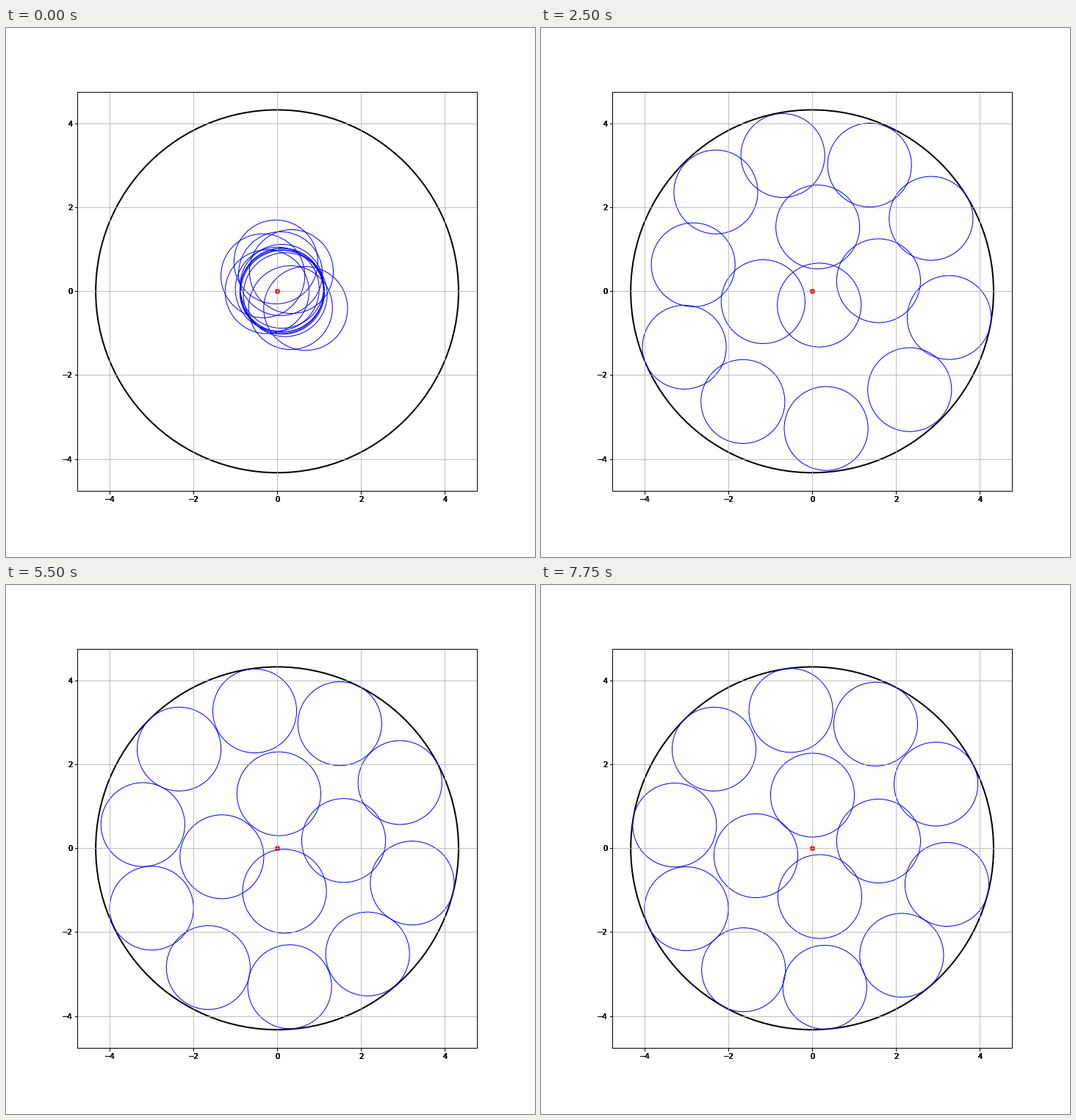
A matplotlib script for the animation above (8000 ms loop, 720 by 720 pixels).

```python
import numpy as np
import matplotlib.pyplot as plt
from matplotlib.animation import FuncAnimation
from matplotlib.patches import Circle

SIZE, DPI = 720, 72
FRAMES, INTERVAL = 32, 250
BURST = 6                    # frames the opening burst takes
R = 4.328                    # container radius, small discs have radius 1
LIMIT = 1.1 * R
MIDDLE = (369.05, 358.35)    # axes centre in pixels from the top left
SIDE = 543.2                 # axes side in pixels
RING, INNER = 10, 4
COUNT = RING + INNER

rng = np.random.default_rng(4)

# Positions are complex numbers in data units; ring discs come first,
# counter-clockwise from the lower right, then the inner ones.
start = rng.normal(0.1, 0.06, COUNT) + 1j * rng.normal(0.03, 0.06, COUNT)
start[:7] = [0.32 - 0.39j, 0.68 - 0.41j, 0.34 + 0.47j, 0.08 + 0.42j,
             -0.03 + 0.70j, -0.34 + 0.37j, -0.24 - 0.01j]

# Where the burst leaves the discs
loose = np.array([2.436 - 2.255j, 3.303 - 0.485j, 2.760 + 1.873j,
                  1.296 + 3.056j, -0.772 + 3.231j, -2.294 + 2.399j,
                  -2.627 + 0.634j, -3.060 - 1.282j, -1.675 - 2.492j,
                  0.337 - 3.240j, 1.568 + 0.287j, 0.213 + 1.628j,
                  -1.088 - 0.274j, 0.183 + 0.067j])

# Settled packing: a nearly even ring with one wider gap, four discs inside
step = np.linspace(0, 1, RING)
angles = 27.4 + 317.6 * step + 1.9 * np.sin(np.pi * step) ** 2
ring = np.roll((R - 1) * np.exp(1j * np.radians(angles)), 2)
inner = [1.585 + 0.173j, 0.008 + 1.268j, -1.342 - 0.178j, 0.183 - 1.151j]
settled = np.concatenate([ring, inner])

# Small random search steps while the packing settles
wobble = rng.normal(0, 0.018, (FRAMES, COUNT, 2)) @ [1, 1j]


def ease_out(u, power):
    return 1 - (1 - u) ** power


def centres(i):
    if i <= BURST:
        return start + (loose - start) * ease_out(i / BURST, 1.8)
    u = (i - BURST) / (FRAMES - 1 - BURST)
    pos = loose + (settled - loose) * ease_out(u, 2.2) + wobble[i] * (1 - u)
    return pos * np.minimum(1, (R - 1) / abs(pos))


fig = plt.figure(figsize=(SIZE / DPI, SIZE / DPI), dpi=DPI, facecolor="white")


def add_axes(name):
    left = MIDDLE[0] - SIDE / 2
    bottom = SIZE - MIDDLE[1] - SIDE / 2
    box = [v / SIZE for v in (left, bottom, SIDE, SIDE)]
    axes = fig.add_axes(box, label=name, facecolor="none")
    axes.set(xlim=(-LIMIT, LIMIT), ylim=(-LIMIT, LIMIT),
             xticks=range(-4, 5, 2), yticks=range(-4, 5, 2))
    return axes


ax = add_axes("main")
ax.grid(True)
# Stacked copies give the heavy tick labels
for layer in range(6):
    add_axes(f"layer {layer}")

ax.add_patch(Circle((0, 0), R, fill=False, ec="black", lw=2))
ax.scatter([0], [0], s=36, color="red")
discs = [ax.add_patch(Circle((0, 0), 1, fill=False, ec="blue", lw=1))
         for _ in range(COUNT)]


def update(i):
    for disc, pos in zip(discs, centres(i)):
        disc.center = (pos.real, pos.imag)
    return discs


anim = FuncAnimation(fig, update, frames=FRAMES, interval=INTERVAL,
                     repeat=True, repeat_delay=0, blit=False)
plt.show()
```
